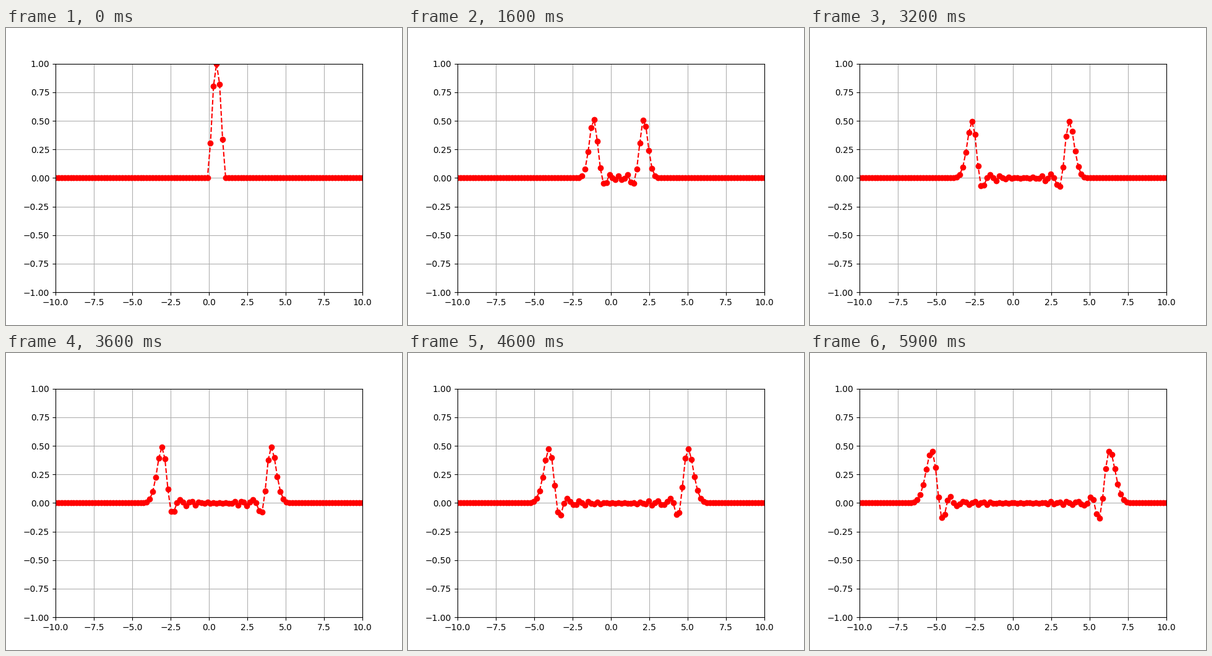
Animation of 640x480 px, one loop 6 s. Source, as a matplotlib script:

```python
import numpy as np
import matplotlib.pyplot as plt
from matplotlib.animation import FuncAnimation

FRAMES = 60
INNER = 100
DT = 0.1

x = np.linspace(-10, 10, INNER + 2)
r2 = (DT / (x[1] - x[0])) ** 2


def bend(u):
    """Scaled second difference, zero at the fixed ends."""
    d = np.zeros_like(u)
    d[1:-1] = r2 * (u[2:] - 2 * u[1:-1] + u[:-2])
    return d


def solve():
    """Leapfrog solution of the wave equation, starting at rest."""
    start = np.where((x >= 0) & (x <= 1), np.sin(np.pi * x), 0.0)
    waves = [start, start + bend(start) / 2]
    while len(waves) <= FRAMES:
        waves.append(2 * waves[-1] - waves[-2] + bend(waves[-1]))
    # The first computed step only seeds the scheme and is not shown.
    return [waves[0]] + waves[2:]


shown = solve()

fig, ax = plt.subplots(figsize=(6.4, 4.8), dpi=100)
ax.set_xlim(-10, 10)
ax.set_ylim(-1, 1)
ax.grid(True)
line, = ax.plot(x, shown[0], "ro--")


def update(i):
    line.set_ydata(shown[i])
    return line,


anim = FuncAnimation(fig, update, frames=FRAMES, interval=100,
                     repeat=True, repeat_delay=0)
plt.show()
```
